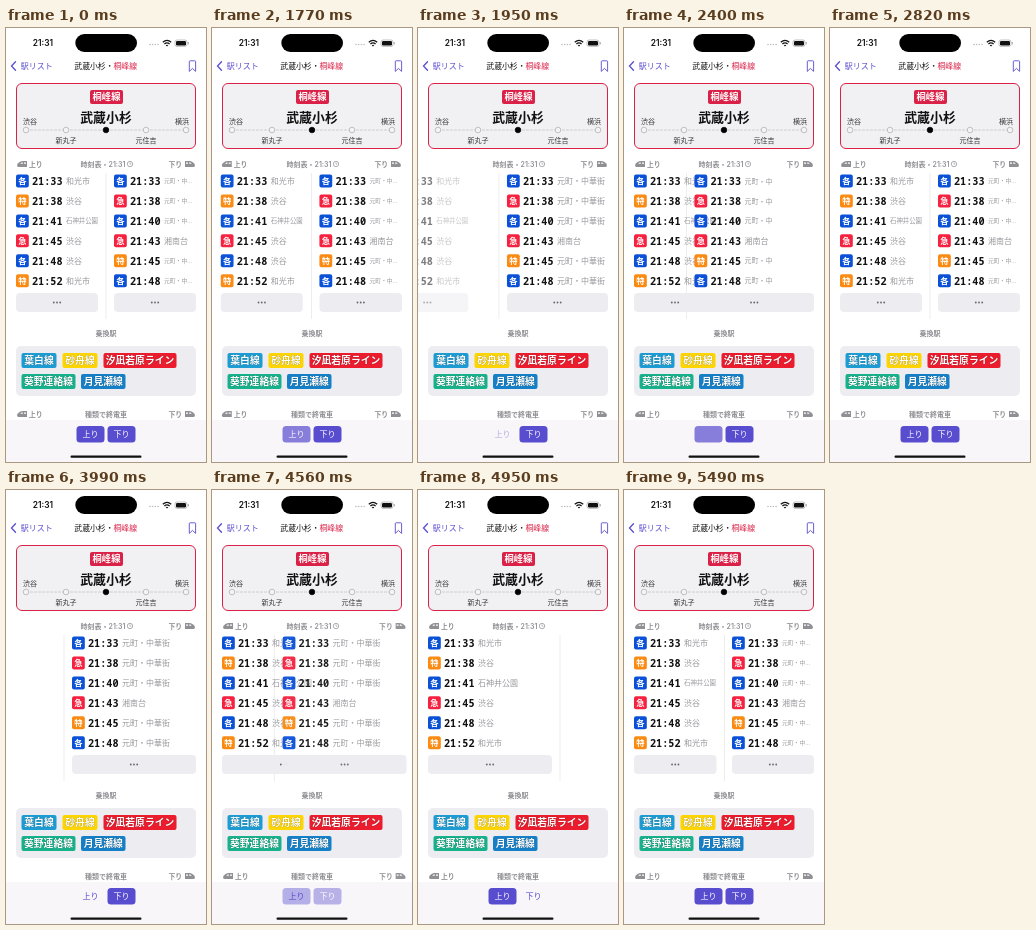
An HTML page that plays this animation: 200 px wide and 434 px high, repeating every 5.64 s.

```html
<!DOCTYPE html>
<html lang="ja">
<head>
<meta charset="utf-8">
<title>時刻表</title>
<style>
html, body { margin: 0; width: 100%; height: 100%; overflow: hidden; background: #fff; }
svg { display: block; width: 100vw; height: 100vh; font-family: Inter, "Noto Sans CJK JP", "Noto Sans CJK", sans-serif; }
.time { font-family: "Noto Sans Mono", "DejaVu Sans Mono", monospace; }
.tag { text-shadow: 0 .4px 1px #0007; }
</style>
</head>
<body>
<svg id="stage" viewBox="0 0 200 434"></svg>
<script>
const LOOP = 5640, MOVE = 450;
const PURPLE = [88, 76, 207], GRAY = '#8f8f94', PANEL = '#ededf1', RED = '#da2147';
const purple = `rgb(${PURPLE})`;
const stage = document.getElementById('stage');

function add(parent, tag, attrs = {}, content) {
  const node = document.createElementNS('http://www.w3.org/2000/svg', tag);
  set(node, attrs);
  if (content !== undefined) node.textContent = content;
  parent.appendChild(node);
  return node;
}
function set(node, attrs) {
  for (const key in attrs) node.setAttribute(key, attrs[key]);
}
const rect = (parent, x, y, width, height, rx, fill, more) =>
  add(parent, 'rect', { x, y, width, height, rx, fill, ...more });
const path = (parent, d, more) => add(parent, 'path', { d, fill: 'none', ...more });
// y is the optical middle of the line of text
const label = (parent, content, x, y, size, fill, weight = 400, anchor = 'start', more) =>
  add(parent, 'text', { x, y: y + size * .37, 'font-size': size, fill, 'font-weight': weight, 'text-anchor': anchor, ...more }, content);

function train(parent, x, y, flip) {
  const g = add(parent, 'g', { transform: `translate(${x} ${y}) scale(${flip ? -1 : 1} 1)` });
  path(g, 'M0 4Q2 0 6 0H10V6H1.5Q0 6 0 4Z', { fill: GRAY });
  path(g, 'M3.2 2.8L4.6 1.4H5.8V2.8ZM7 1.4H9V2.8H7Z', { fill: '#fff' });
}

function statusAndTitle() {
  rect(stage, 69.3, 6, 61.7, 18, 9, '#000');
  label(stage, '21:31', 37, 15.3, 8.4, '#111', 600, 'middle');
  for (let i = 0; i < 4; i++) add(stage, 'circle', { cx: 144 + i * 2.7, cy: 16.5, r: .8, fill: '#bbb' });
  path(stage, 'M156.8 14.2Q161 10.6 165.2 14.2M158.4 16Q161 13.9 163.6 16', { stroke: '#111', 'stroke-width': 1.3 });
  path(stage, 'M159.7 17.2Q161 16.2 162.3 17.2L161 18.5Z', { fill: '#111' });
  rect(stage, 169, 12, 12, 6.4, 2, 'none', { stroke: '#999', 'stroke-width': .6 });
  rect(stage, 170, 13, 10, 4.4, 1.2, '#111');
  rect(stage, 181.8, 14, .9, 2.4, .4, '#999');

  path(stage, 'M9.5 33.8L5.5 38L9.5 42.2', { stroke: purple, 'stroke-width': 1.3, 'stroke-linecap': 'round' });
  label(stage, '駅リスト', 14.8, 38, 8, purple);
  const title = label(stage, '武蔵小杉・', 99.7, 38, 7.85, '#111', 500, 'middle');
  add(title, 'tspan', { fill: RED }, '桐峰線');
  path(stage, 'M183.3 33.6Q183.3 32.8 184.1 32.8H188.8Q189.6 32.8 189.6 33.6V43.4L186.45 40.4L183.3 43.4Z',
    { stroke: purple, 'stroke-width': .9, 'stroke-linejoin': 'round' });
}

function stationCard() {
  rect(stage, 10.5, 55.5, 179, 65, 5.5, '#f1f0f3', { stroke: RED });
  rect(stage, 84, 62, 33, 14, 2, RED);
  label(stage, '桐峰線', 100.5, 69, 9.3, '#fff', 600, 'middle');
  label(stage, '武蔵小杉', 100, 89.3, 12.9, '#111', 600, 'middle');
  path(stage, 'M20 102H180', { stroke: '#c4c4c8', 'stroke-width': .8, 'stroke-dasharray': '3 1' });
  const stops = [['渋谷', 24, 93], ['新丸子', 60, 112], ['', 0, 0], ['元住吉', 140, 112], ['横浜', 176, 93]];
  stops.forEach(([name, x, y], i) => {
    const here = i === 2;
    add(stage, 'circle', { cx: 20 + i * 40, cy: 102, r: 2.8, fill: here ? '#000' : '#f4f3f5', stroke: here ? '#000' : '#aaa', 'stroke-width': .7 });
    if (name) label(stage, name, x, y, 7, '#333', 400, 'middle');
  });
}

function transfers() {
  label(stage, '乗換駅', 100, 305.5, 7, GRAY, 600, 'middle');
  rect(stage, 10, 318, 180, 50, 5, PANEL);
  [
    ['葉白線', 15.5, 325, 35, '#1c9cd3'], ['砂舟線', 56.5, 325, 35, '#ffd500'],
    ['汐凪若原ライン', 97.5, 325, 73, '#ea1c2d'],
    ['葵野連絡線', 15.5, 346, 54, '#17b18b'], ['月見瀬線', 75, 346, 44.5, '#1580c8']
  ].forEach(([name, x, y, w, fill]) => {
    rect(stage, x, y, w, 15, 2, fill);
    label(stage, name, x + w / 2, y + 7.4, 9.8, '#fff', 600, 'middle', { class: 'tag' });
  });
}

const KINDS = { 各: '#0a51d8', 特: '#fa8a12', 急: '#f5213f' };

function column(rows) {
  const g = add(stage, 'g');
  const names = rows.map(([kind, time, name], i) => {
    const y = 153 + i * 19.95;
    rect(g, 0, y - 6.5, 12.8, 13, 2, KINDS[kind]);
    label(g, kind, 6.4, y, 8.3, '#fff', 700, 'middle');
    label(g, time, 16, y, 10.2, '#111', 600, 'start', { class: 'time' });
    return { name, y, node: label(g, name, 50, y, 8, '#98989d') };
  });
  const bar = rect(g, 0, 265, 82, 19, 4, PANEL);
  const dots = add(g, 'g');
  for (let i = -1; i < 2; i++) add(dots, 'circle', { cx: i * 3.2, cy: 274.5, r: .9, fill: '#66666b' });
  return { g, names, bar, dots };
}

function heads(right) {
  const g = add(stage, 'g');
  for (const y of [136, 386]) {
    train(g, right ? 189 : 11, y - 3, right);
    label(g, right ? '下り' : '上り', right ? 162.5 : 23, y, 6.8, GRAY, 600);
  }
  return g;
}

function toggle(name, x) {
  const g = add(stage, 'g');
  return {
    g,
    back: rect(g, x, 398, 28, 16.5, 3.5, purple),
    text: label(g, name, x + 14, 406.2, 8, '#fff', 500, 'middle')
  };
}

statusAndTitle();
stationCard();
label(stage, '時刻表・21:31', 97, 136, 7, GRAY, 600, 'middle');
add(stage, 'circle', { cx: 124, cy: 136, r: 2.7, fill: 'none', stroke: GRAY, 'stroke-width': .7 });
path(stage, 'M124 134.4V136.2H125.3', { stroke: GRAY, 'stroke-width': .6 });
const divider = rect(stage, 0, 145, .6, 146, 0, '#e2e2e5');
const left = column([
  ['各', '21:33', '和光市'], ['特', '21:38', '渋谷'], ['各', '21:41', '石神井公園'],
  ['急', '21:45', '渋谷'], ['各', '21:48', '渋谷'], ['特', '21:52', '和光市']
]);
const right = column([
  ['各', '21:33', '元町・中華街'], ['急', '21:38', '元町・中華街'], ['各', '21:40', '元町・中華街'],
  ['急', '21:43', '湘南台'], ['特', '21:45', '元町・中華街'], ['各', '21:48', '元町・中華街']
]);
left.head = heads(false);
right.head = heads(true);
transfers();
label(stage, '種類で終電車', 100, 386, 7, GRAY, 600, 'middle');
rect(stage, 0, 392, 200, 42, 0, '#f8f6f9');
left.toggle = toggle('上り', 70.5);
right.toggle = toggle('下り', 101.5);
rect(stage, 64.5, 427.6, 71, 2.2, 1.1, '#111');

const VIEWS = {
  both: { left: 1, right: 1, split: 100 },
  up: { left: 1, right: 0, split: 142 },
  down: { left: 0, right: 1, split: 58 }
};
// start time, view, tapped toggle
const STEPS = [
  [0, 'both'], [1740, 'down', 'left'], [2310, 'both', 'left'], [2880, 'up', 'right'],
  [3450, 'down', 'left'], [4500, 'up', 'right'], [5070, 'both', 'right']
];
const mix = (a, b, p) => a + (b - a) * p;
const ramp = (t, from, to) => Math.max(0, Math.min(1, (t - from) / (to - from)));

function fitNames(names, narrow, moving) {
  for (const { name, y, node } of names) {
    let shown = name, size = 8;
    if (narrow && name.length > 5) [shown, size] = moving ? [name.slice(0, 4), 7] : [name.slice(0, 4) + '…', 5.8];
    else if (narrow) size = Math.min(8, 32 / name.length);
    if (node.textContent !== shown) node.textContent = shown;
    set(node, { 'font-size': size, y: y + size * .37 });
  }
}

// A tap dims the button; its fill changes first and its text follows.
function drawToggle({ g, back, text }, was, is, tapped, elapsed) {
  const white = mix(was, is, ramp(elapsed, 100, 300));
  set(g, { opacity: tapped ? mix(.7, 1, ramp(elapsed, 130, 350)) : 1 });
  set(back, { opacity: mix(was, is, ramp(elapsed, 40, 90)) });
  set(text, { fill: `rgb(${PURPLE.map(c => Math.round(mix(c, 255, white)))})` });
}

function drawSide(side, key, from, to, p, elapsed) {
  const was = from[key], is = to[key], leaving = was && !is;
  const split = leaving ? from.split : was ? mix(from.split, to.split, p) : to.split;
  const isRight = key === 'right';
  const slide = leaving ? p * (isRight ? 92 : -(from.split - 8)) : 0;
  const width = isRight ? 182 - split : split - 18;
  const opacity = leaving ? 1 - p : is ? (was ? 1 : ramp(elapsed, 0, 60)) : 0;

  set(side.g, { transform: `translate(${(isRight ? split + 8 : 10) + slide} 0)`, opacity });
  set(side.head, { transform: `translate(${slide} 0)`, opacity });
  set(side.bar, { width });
  set(side.dots, { transform: `translate(${width / 2} 0)` });
  const layout = leaving || p < .03 && was ? from : to;
  fitNames(side.names, layout === VIEWS.both, was && is && p > .03 && p < .7);
}

function draw(t) {
  let i = STEPS.length - 1;
  while (STEPS[i][0] > t) i--;
  const [begin, view, tapped] = STEPS[i];
  const to = VIEWS[view], from = i ? VIEWS[STEPS[i - 1][1]] : to;
  const elapsed = t - begin;
  const u = ramp(elapsed, 0, MOVE), p = u * u * (3 - 2 * u);
  set(divider, { x: mix(from.split, to.split, p) - .3 });
  for (const [key, side] of Object.entries({ left, right })) {
    drawSide(side, key, from, to, p, elapsed);
    drawToggle(side.toggle, from[key], to[key], tapped === key, elapsed);
  }
}

const start = performance.now();
function tick() {
  draw((performance.now() - start) % LOOP);
  requestAnimationFrame(tick);
}
tick();
</script>
</body>
</html>
```
